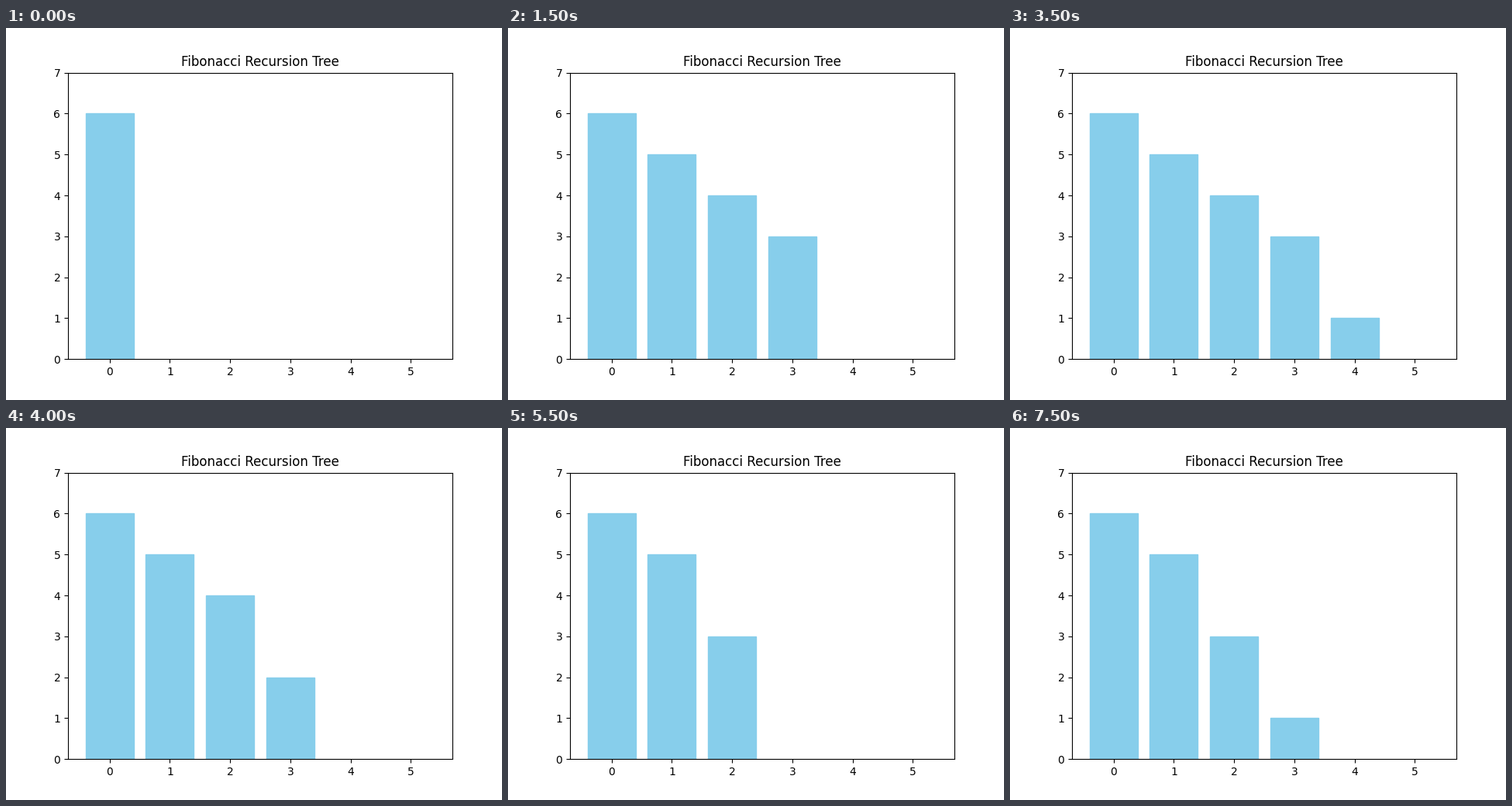
These frames come from a looping animation (640x480 px, 8000 ms). A matplotlib script:

```python
from itertools import islice

import matplotlib.pyplot as plt
from matplotlib.animation import FuncAnimation

N = 6
STEPS = 16
STEP_MS = 500


def calls(n, stack=()):
    """Yield the call stack at each call of a naive recursive fib(n)."""
    stack += (n,)
    yield stack
    if n > 1:
        yield from calls(n - 1, stack)
        yield from calls(n - 2, stack)


stacks = list(islice(calls(N), STEPS))

fig, ax = plt.subplots(figsize=(6.4, 4.8), dpi=100)
ax.set_title("Fibonacci Recursion Tree")
bars = ax.bar(range(N), range(N, 0, -1), color="skyblue",
              edgecolor="skyblue", linewidth=1)
ax.set_xlim(-0.69, N - 0.31)
ax.set_ylim(0, N + 1)


def update(step):
    stack = stacks[step]
    for depth, bar in enumerate(bars):
        active = depth < len(stack)
        bar.set_visible(active)
        bar.set_height(stack[depth] if active else 0)
    return list(bars)


anim = FuncAnimation(fig, update, frames=STEPS, interval=STEP_MS,
                     repeat=True, repeat_delay=0, blit=False)
plt.show()
```
